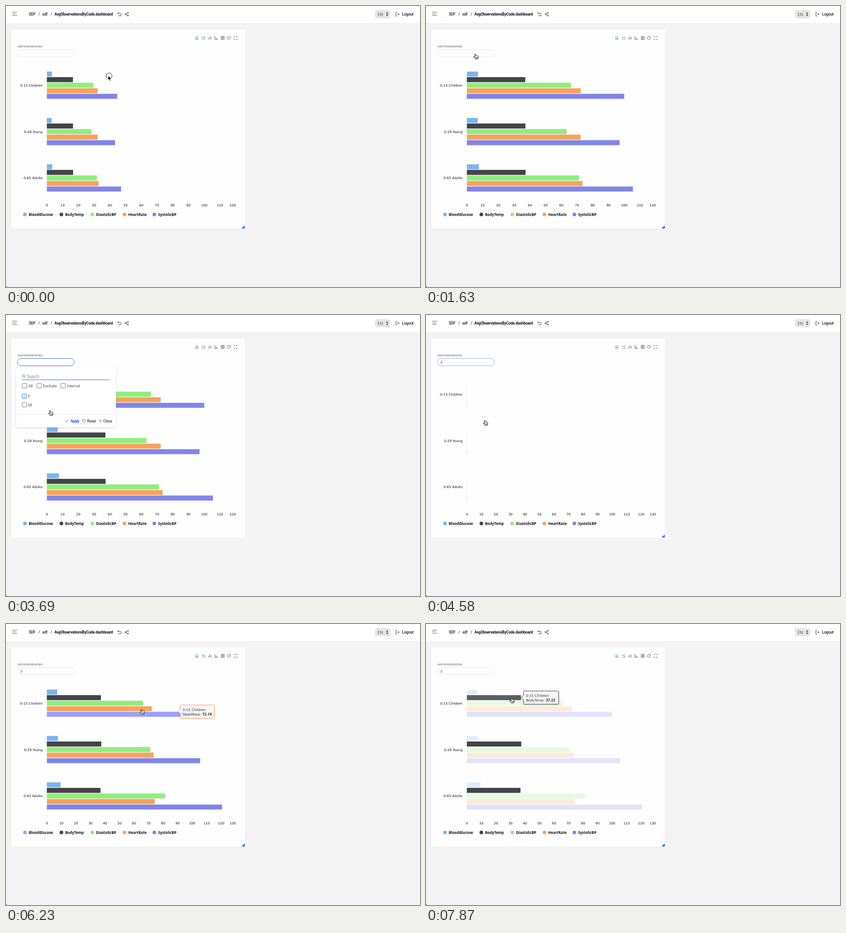
Animation of 907x617 px, one loop 8 s. Source, as an HTML page:

```html
<!DOCTYPE html>
<html lang="en">
<head>
<meta charset="utf-8">
<title>Dashboard filter</title>
<style>
html, body { margin: 0; width: 100%; height: 100%; overflow: hidden; background: #f3f3f3; }
svg { display: block; }
.ui { font-family: Roboto, "Liberation Sans", sans-serif; letter-spacing: -.03em; fill: #222; }
.chart { font-family: "DejaVu Sans", sans-serif; font-size: 7.25px; fill: #111; }
.bold { font-family: "Noto Sans", sans-serif; font-weight: 700; }
.line { fill: none; stroke: #666; stroke-width: 1; }
.blue { stroke: #1f6fe5; }
.opt { font-size: 9.8px; fill: #666; }
.btn { font-size: 8.6px; font-weight: 700; fill: #666; }
</style>
</head>
<body>
<svg id="stage" width="907" height="617" viewBox="0 0 907 617">
  <defs>
    <filter id="soft" x="-10%" y="-15%" width="120%" height="135%">
      <feDropShadow dx="0" dy="1" stdDeviation="1.6" flood-opacity=".2"/>
    </filter>
  </defs>
  <rect width="907" height="617" fill="#f3f3f3"/>
  <rect y="38" width="907" height="1" fill="#ececec"/>
  <rect width="907" height="38" fill="#fff"/>
  <path d="M0 615L2 617H0Z" fill="#111"/>

  <g class="ui" font-size="8.3" font-weight="500">
    <path class="line" d="M13.5 13.5H24.5M13.5 17H21.5M13.5 20.5H24.5"/>
    <text x="50" y="21">SDF</text><text x="71" y="21">/</text>
    <text x="79.5" y="21">sdf</text><text x="98" y="21">/</text>
    <text x="106" y="21" font-size="8.4" font-weight="700" fill="#111">AvgObservationsByCode.dashboard</text>
    <g class="line" style="stroke:#444">
      <path d="M246.5 14L244.5 16L246.5 18M244.5 16H250Q252 16 252 18V21.5H246"/>
      <path d="M262.5 17.2L266.3 15.2M262.5 18.8L266.3 20.8"/>
      <circle cx="262" cy="18" r="1.3"/><circle cx="267.2" cy="15" r="1.3"/><circle cx="267.2" cy="21" r="1.3"/>
    </g>
    <rect x="809.5" y="10" width="31" height="16" rx="2.5" fill="#e7e7e7" stroke="#d6d6d6"/>
    <text x="814" y="21.5" font-size="9.8" font-weight="400" fill="#666">EN</text>
    <path d="M832.5 17L835 13.5L837.5 17ZM832.5 19L835 22.5L837.5 19Z" fill="#444"/>
    <path class="line" style="stroke:#444" d="M857 14H854V22H857M856.5 18H861.5M859.5 16L861.5 18L859.5 20"/>
    <text x="867.5" y="21" font-size="8.6">Logout</text>
  </g>

  <rect x="12" y="52" width="511" height="436.5" fill="#fefefe"/>
  <path id="corner" d="M523 482V488.5H516Z" fill="#1769e8"/>
  <g class="line" stroke-width=".9">
    <path style="stroke:#2196e8" d="M414.5 68.5Q416.5 66.5 418 68T421.5 67.5M414.5 71H421.5M414.5 73H421.5"/>
    <path d="M429 69.5L431 68L433 69.5L436 66.5M429 73H431M432 73H434M435.5 70V73.5"/>
    <path d="M443.5 73.5V70M446.5 73.5V66.5M449.5 73.5V68"/>
    <path d="M457.5 66V73.5H464.5M459.5 69H461M459.5 71.3H463"/>
    <path d="M471.5 66.5H478V73.5H471.5ZM471.5 70H478M474.8 66.5V73.5"/>
    <path d="M488.5 73.5C483.5 73.5 483.8 66.5 488.8 66.5C493 66.5 493.5 71 490.5 71C488.5 71 490.5 73.5 488.5 73.5M486.7 69.5H487.5M489.5 68.5H490.3"/>
    <path d="M499.7 68.5V66.5H501.7M504.3 66.5H506.3V68.5M506.3 71.5V73.5H504.3M501.7 73.5H499.7V71.5"/>
  </g>
  <text class="ui" x="25" y="91" font-size="7.3" style="fill:#777">AdministrativeSex</text>
  <rect id="field" x="25" y="95.5" width="124.5" height="16" rx="8" fill="#fff"/>
  <text id="choice" class="ui" x="32" y="107.5" font-size="8.8" style="fill:#666">F</text>

  <g id="bars"></g>
  <g id="labels" class="chart"></g>
  <g id="ticks" class="chart" text-anchor="middle"></g>
  <g id="legend"></g>

  <g id="tip">
    <path id="tipBox" fill="#f7f7f7" fill-opacity=".85" filter="url(#soft)"/>
    <g class="chart" style="font-size:7.4px;fill:#333">
      <text x="10.5" y="-2">0-15 Children</text>
      <text x="10.5" y="8"><tspan id="tipName"></tspan> <tspan id="tipValue" class="bold" font-size="8.2"></tspan></text>
    </g>
  </g>

  <g id="popup" class="ui">
    <rect x="22" y="114" width="219" height="133" rx="6" fill="#fff" filter="url(#soft)"/>
    <circle class="line" cx="38.3" cy="133.8" r="2.4"/><path class="line" d="M40 135.5L42.3 138"/>
    <text x="45" y="138.5" font-size="10" fill="#999">Search</text>
    <path class="line blue" d="M35 142.3H227"/>
    <rect id="hover" x="35" width="192" height="18" fill="#e6effc"/>
    <g id="checks"></g>
    <path d="M22 218.5H241" stroke="#e9e9e9"/>
    <path class="line blue" d="M129.5 232.5L132 235L137 229.5"/>
    <text class="btn" x="141" y="235.5" style="fill:#1f6fe5">Apply</text>
    <path class="line" d="M167.5 230V232.2H169.7M167.6 231.8A3.3 3.3 0 1 1 169 235.2"/>
    <text class="btn" x="177.5" y="235.5">Reset</text>
    <path class="line" d="M203.5 229.5L209.5 235.5M209.5 229.5L203.5 235.5"/>
    <text class="btn" x="213" y="235.5">Close</text>
  </g>

  <circle id="ring" cx="225.7" cy="153.5" r="6.5" fill="none" stroke="#222"/>
  <g id="cursor">
    <path id="arrow" d="M0 0V9.6L2.2 7.6L3.9 11.4L5.5 10.7L3.9 7H6.8Z" fill="#000" stroke="#fff" stroke-width=".6"/>
    <path id="hand" d="M-1.2 1.2Q-1 -.2 .2 .5L1.2 3.7Q2.3 2.8 3 3.9Q4.3 3.2 4.8 4.3Q6.3 4 6.3 5.6L5.9 8.5L5 11.3H-.4L-1.2 9.5L-3.6 6.9Q-3.5 5.4 -2 6L-.3 7.2ZM1.4 7.5V9.5M3 7.5V9.5M4.5 7.5V9.5" fill="#fff" stroke="#111" stroke-width="1" stroke-linejoin="round"/>
  </g>
</svg>
<script>
const LOOP = 8000, STEP = 148.1, LAST = 53;
const X0 = 89.5, PLOT = 413.8, RELOAD = 31;
const $ = id => document.getElementById(id);
const set = (el, attrs) => { for (const k in attrs) el.setAttribute(k, attrs[k]); return el; };
const add = (parent, tag, attrs, text = "") => {
  const el = set(document.createElementNS("http://www.w3.org/2000/svg", tag), attrs);
  el.textContent = text;
  return parent.appendChild(el);
};
const show = (id, on) => set($(id), { opacity: +on });

const series = [
  { name: "BloodGlucose", color: "#7cb5ec", light: "#96cfff", x: 41.5 },
  { name: "BodyTemp", color: "#434348", light: "#5d5d62", x: 121.3 },
  { name: "DiastolicBP", color: "#90ed7d", light: "#aaff97", x: 189 },
  { name: "HeartRate", color: "#f7a35c", light: "#ffbd76", x: 259.5 },
  { name: "SystolicBP", color: "#8085e9", light: "#9a9fff", x: 325 }
];
const groups = ["0-15 Children", "0-29 Young", "0-65 Adults"];
const everyone = {
  max: 120, start: -466,
  rows: [[7.1, 37.1, 66.2, 72.3, 100], [6.9, 37.2, 63.3, 72.3, 97], [7.7, 37.3, 71.2, 73.5, 105.5]]
};
const women = {
  max: 130, start: 4572,
  rows: [[7.1, 37.22, 66.24, 72.19, 99.8], [7.6, 37.45, 71.2, 73.5, 105.5], [9.5, 36.9, 81.5, 74.3, 120.6]]
};

// Keys are [step, x, y]
const pointerPath = [
  [0, 224, 153], [8, 325, 133], [11, 108, 105], [13, 108, 105], [18, 47, 176], [21, 47, 176],
  [28, 129, 231], [31, 129, 231], [36, 333, 251], [41, 303, 196], [42, 297, 187],
  [46, 230, 183], [49, 230, 183], [53, 187, 162]
];
const tipPath = [
  [41, 407.3, 198.4], [42, 377, 192.5], [43, 320, 186.3], [49, 320, 186.3],
  [50, 300.5, 174], [51, 300.5, 174], [52, 208.7, 161.6]
];

function along(path, n) {
  const i = path.findIndex(k => k[0] >= n);
  if (i < 0) return path[path.length - 1].slice(1);
  if (i === 0) return path[0].slice(1);
  const [a, b] = [path[i - 1], path[i]];
  let u = (n - a[0]) / (b[0] - a[0]);
  u = u * u * (3 - 2 * u);
  return [1, 2].map(k => a[k] + (b[k] - a[k]) * u);
}

const grow = (t, start) => {
  const u = Math.min(1, Math.max(0, (t - start) / 1000));
  return (1 - Math.cos(Math.PI * u)) / 2;
};

const bars = groups.map((name, g) => {
  const mid = 174 + 101.8 * g;
  add($("labels"), "text", { x: 80, y: mid + 2.7, "text-anchor": "end" }, name);
  return series.map((s, j) => add($("bars"), "rect", { x: X0, y: mid + 12.2 * (j - 2) - 5.6, height: 11 }));
});

for (const s of series) {
  add($("legend"), "circle", { cx: s.x, cy: 457.8, r: 4, fill: s.color });
  add($("legend"), "text", { x: s.x + 8.2, y: 460.8, class: "bold", "font-size": 7.9, fill: "#111" }, s.name);
}

const ticks = Array.from({ length: 14 }, () => add($("ticks"), "text", { y: 440.3 }));

const checks = [["All", 35.5, 150.5], ["Exclude", 67.5, 150.5], ["Interval", 120, 150.5], ["F", 35.5, 173.5], ["M", 35.5, 192.2]]
  .map(([name, x, y]) => {
    const box = add($("checks"), "rect", { x, y, width: 9.8, height: 9.8, rx: 1, fill: "#fff" });
    const mark = add($("checks"), "path", { class: "line blue", d: `M${x + 2.3} ${y + 5}l2 2l3.6 -4` });
    add($("checks"), "text", { x: x + 13, y: y + 8.6, class: "opt" }, name);
    return { box, mark };
  });

function drawChart(n, t) {
  const data = n < RELOAD ? everyone : women;
  const scale = PLOT / data.max, p = grow(t, data.start);
  const active = n < 43 ? -1 : n < 50 ? 3 : n < 52 ? 2 : 1;
  const lit = n === 41 || n === 42 ? 4 : active;
  bars.forEach((row, g) => row.forEach((bar, j) => set(bar, {
    width: data.rows[g][j] * scale * p,
    fill: g === 0 && j === lit ? series[j].light : series[j].color,
    opacity: active < 0 || active === j ? 1 : .22
  })));
  ticks.forEach((tick, i) => {
    tick.textContent = i * 10 <= data.max ? i * 10 : "";
    set(tick, { x: Math.min(X0 + i * 10 * scale, 496.8) });
  });
}

function drawTip(n) {
  show("tip", n >= 41);
  const k = n < 42 ? 4 : n < 50 ? 3 : n < 52 ? 2 : 1;
  const [x, y] = along(tipPath, n), right = k === 3 ? 79.5 : 82;
  set($("tip"), { transform: `translate(${x} ${y})` });
  set($("tipBox"), {
    d: `M7 -14.5H${right - 2}q2 0 2 2V12.5q0 2 -2 2H7q-2 0 -2 -2V5L0 0L5 -5V-12.5q0 -2 2 -2Z`,
    stroke: series[k].color
  });
  $("tipName").textContent = series[k].name + ":";
  $("tipValue").textContent = women.rows[0][k].toFixed(2);
}

function drawFilter(n, y) {
  const open = n >= 13 && n < 30;
  set($("popup"), { opacity: !open ? 0 : n === 13 || n === 29 ? .5 : 1 });
  show("corner", !open);
  show("choice", n >= 29);
  set($("field"), { stroke: open ? "#2f76e0" : n === 30 || n === 31 ? "#8db4e8" : "#e6e6e6" });
  const row = y >= 169 && y < 187 ? 169 : y >= 187 && y < 206 ? 188 : 0;
  set($("hover"), { y: row, opacity: row ? 1 : 0 });
  checks.forEach(({ box, mark }, i) => {
    const on = i === (n < 21 ? 0 : 3);
    set(box, { stroke: on ? "#1f6fe5" : "#777" });
    set(mark, { opacity: +on });
  });
}

function draw(time) {
  const n = Math.min(LAST, Math.floor((time + 25) / 148.3));
  const [x, y] = along(pointerPath, n);
  const hand = (n >= 11 && n <= 31) || n >= 41;
  drawChart(n, n * STEP);
  drawTip(n);
  drawFilter(n, y);
  show("ring", n === 0);
  show("hand", hand);
  show("arrow", !hand);
  set($("cursor"), { transform: `translate(${x} ${y})` });
}

const began = performance.now();
function tick() {
  draw((performance.now() - began) % LOOP);
  requestAnimationFrame(tick);
}
tick();
</script>
</body>
</html>
```
